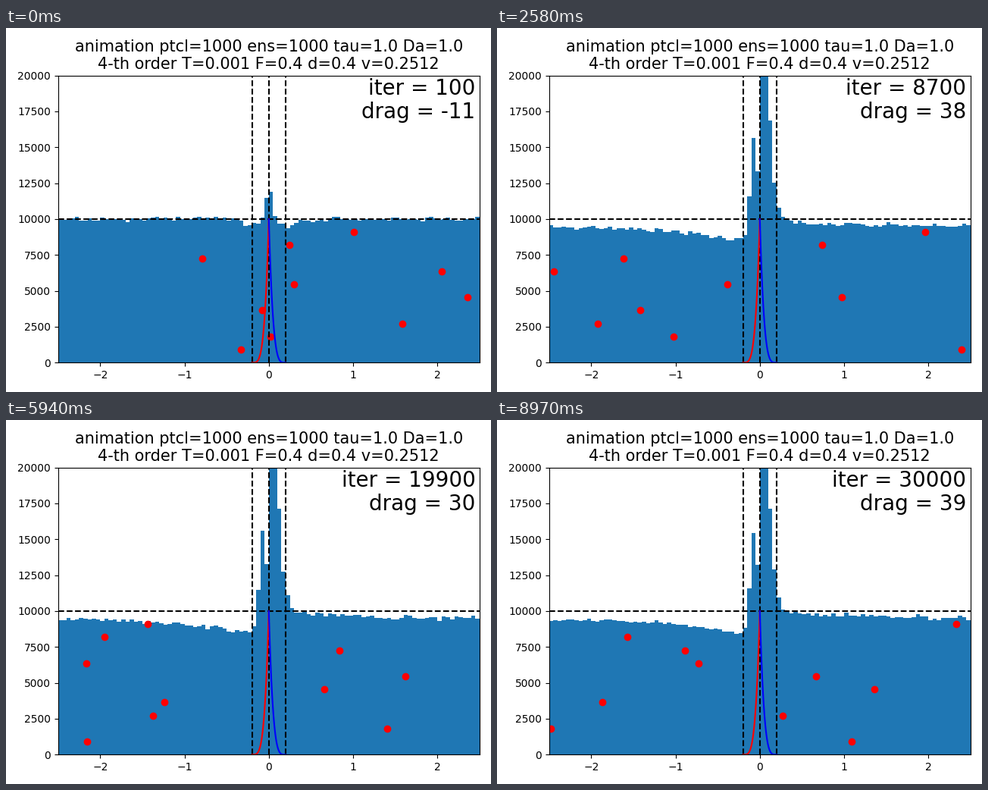
Write a matplotlib script that moves like this. It is 640x480 px and loops after 9000 ms.

```python
import numpy as np
import matplotlib.pyplot as plt
from matplotlib.animation import FuncAnimation

FRAMES, DT, SUBSTEPS, BOX, BINS = 300, 0.1, 10, 5.0, 100
TAU, DA, F, RADIUS, SPEED = 1.0, 1.0, 0.4, 0.2, 0.2512
# Initial tracer positions, bottom to top
ORIGINS = [-.33, .02, 1.585, -.08, 2.36, .30, 2.05, -.79, .245, 1.01]

rng = np.random.default_rng(12)
edges = np.linspace(-BOX / 2, BOX / 2, BINS + 1)
x = (edges[1:] + edges[:-1]) / 2


def rise(t, scale):
    return 1 - np.exp(-t / scale)


def bell(x, center, width):
    return np.exp(-((x - center) / width) ** 2)


def hump(r):
    return np.clip(1 - r / RADIUS, 0, 1) ** 4


def tracer_paths():
    """Active particles with persistent noise, drifting past the trap on a ring."""
    h = DT / SUBSTEPS
    pos = np.array(ORIGINS)
    push = rng.normal(0, np.sqrt(DA / TAU), len(pos))
    paths = [pos]
    for _ in range(FRAMES - 1):
        for _ in range(SUBSTEPS):
            push = push - push * h / TAU + np.sqrt(2 * DA * h) / TAU * rng.normal(size=len(pos))
            trap = -F * np.sign(pos) * hump(np.abs(pos)) ** 0.75
            pos = pos + h * (push + trap - SPEED)
            pos = (pos + BOX / 2) % BOX - BOX / 2
        paths.append(pos)
    return paths


def density(t):
    """Mean bin counts: a small bump, then a trapped peak with a wake on its left."""
    first = 10000 + 2150 * bell(x, 0.005, 0.055) - 420 * bell(np.abs(x), 0.2, 0.12)
    s = rise(t, 2.5)
    far = 10000 - 510 * s
    wake = -1050 * s * np.exp(np.minimum(x + RADIUS, 0) / 0.85)
    left = far + wake + (9600 - 2400 * s) * bell(x, -0.066, 0.064)
    right = (far + 450 * s ** 6 * np.exp(-(x - RADIUS) / 0.8)
             + (3000 + 4100 * s) * np.exp((0.125 - x) / 0.052))
    settled = np.where(x < 0, left, right)
    return first + (settled - first) * rise(t - DT, 0.8)


def counts(i):
    noise = np.random.default_rng(500 + i).normal(0, 90, BINS)
    return density((i + 1) * DT) + noise


paths = tracer_paths()
ramp = rise(DT * np.arange(1, FRAMES + 1), 4)
drag = -12 + ramp * (47 + rng.normal(0, 8, FRAMES))

fig, ax = plt.subplots(figsize=(6.4, 4.8), dpi=100)
ax.set_title("animation ptcl=1000 ens=1000 tau=1.0 Da=1.0\n"
             "4-th order T=0.001 F=0.4 d=0.4 v=0.2512", fontsize=15)
hist = ax.stairs(counts(0), edges, fill=True, color="#1f77b4")
rows = np.arange(1, 11) * 10000 / 11
dots, = ax.plot(paths[0], rows, "ro")

for pos in (-RADIUS, 0, RADIUS):
    ax.axvline(pos, color="k", ls="--")
ax.axhline(10000, color="k", ls="--")
r = np.linspace(0, RADIUS, 60)
ax.plot(-r, 10000 * hump(r), "r")
ax.plot(r, 10000 * hump(r), "b")

iter_label, drag_label = (
    ax.text(0.99, y, "", fontsize=20, ha="right", va="top", transform=ax.transAxes)
    for y in (0.99, 0.91))
ax.set_xlim(-BOX / 2, BOX / 2)
ax.set_ylim(0, 20000)
fig.tight_layout()


def update(i):
    hist.set_data(counts(i))
    dots.set_xdata(paths[i])
    iter_label.set_text(f"iter = {100 * (i + 1)}")
    drag_label.set_text(f"drag = {round(drag[i])}")
    return hist, dots, iter_label, drag_label


anim = FuncAnimation(fig, update, frames=FRAMES, interval=30, repeat=True, repeat_delay=0)
plt.show()
```
